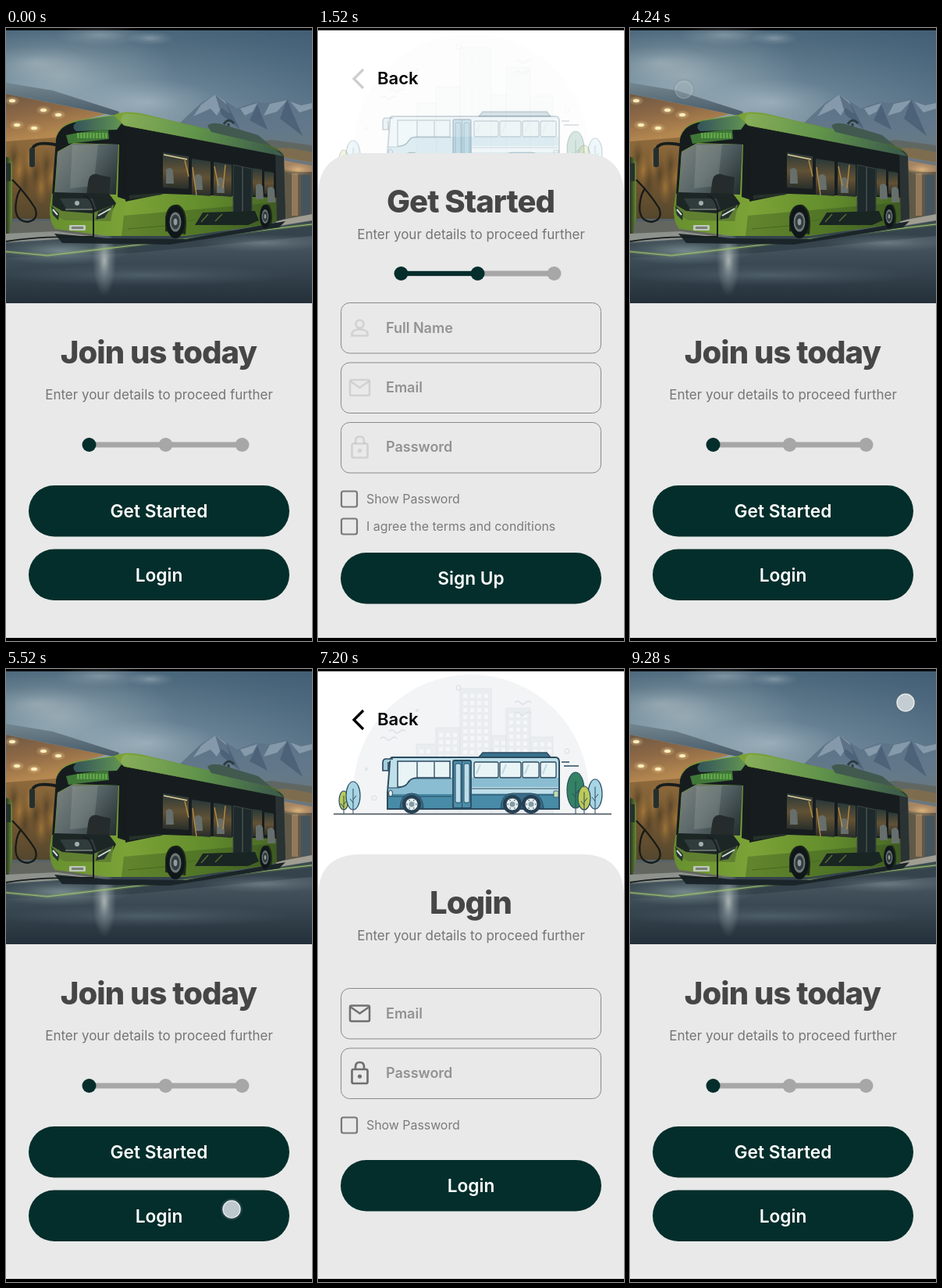
Write an HTML page with a canvas that moves like this. It is 392 by 784 pixels and loops after 9.36 s.

```html
<!DOCTYPE html>
<html lang="en">
<head>
<meta charset="utf-8">
<title>Bus app sign-in</title>
<style>
html, body { margin: 0; width: 100%; height: 100%; overflow: hidden; background: #e9e9e9; }
canvas, svg { position: absolute; left: 0; top: 0; width: 392px; height: 784px; }
text { font-family: Inter, Roboto, sans-serif; }
.mid { text-anchor: middle; }
.title { font-size: 40px; font-weight: 800; letter-spacing: -.95px; fill: #464646; }
.sub { font-size: 17px; fill: #757575; }
.btn { font-size: 22.7px; font-weight: 600; fill: #fff; }
.field { font-size: 18px; font-weight: 600; fill: #929292; }
.check { font-size: 15.9px; fill: #7b7b7b; }
.back { font-size: 22px; font-weight: 600; fill: #000; }
</style>
</head>
<body>
<canvas id="stage"></canvas>
<svg viewBox="0 0 392 784">
  <g id="welcome">
    <text class="mid title" x="195.5" y="429">Join us today</text>
    <text class="mid sub" x="196" y="475">Enter your details to proceed further</text>
    <text class="mid btn" x="196" y="626">Get Started</text>
    <text class="mid btn" x="196" y="708">Login</text>
  </g>
  <g id="signup">
    <text class="back" x="76" y="72">Back</text>
    <text class="mid title" x="195.5" y="236">Get Started</text>
    <text class="mid sub" x="196" y="270">Enter your details to proceed further</text>
    <text class="field" x="87" y="390">Full Name</text>
    <text class="field" x="87" y="466">Email</text>
    <text class="field" x="87" y="542">Password</text>
    <text class="check" x="62" y="608">Show Password</text>
    <text class="check" x="62" y="643">I agree the terms and conditions</text>
    <text class="mid btn" x="196" y="712">Sign Up</text>
  </g>
  <g id="login">
    <text class="back" x="76" y="72">Back</text>
    <text class="mid title" x="195.5" y="313">Login</text>
    <text class="mid sub" x="196" y="347">Enter your details to proceed further</text>
    <text class="field" x="87" y="447">Email</text>
    <text class="field" x="87" y="523">Password</text>
    <text class="check" x="62" y="589">Show Password</text>
    <text class="mid btn" x="196" y="669">Login</text>
  </g>
</svg>
<script>
const W = 392, H = 784, LOOP = 9360, FADE = 420;
const DARK = '#032e2b', GREY = '#a7a7a7', PAGE = '#e9e9e9', INK = '#2b4a60';
const canvas = document.getElementById('stage');
const ratio = window.devicePixelRatio || 1;
canvas.width = W * ratio;
canvas.height = H * ratio;
const c = canvas.getContext('2d');

// Each screen holds until the next one starts
const screens = [
  { at: 0, name: 'welcome' }, { at: 1440, name: 'signup' },
  { at: 4160, name: 'welcome' }, { at: 5760, name: 'login' },
  { at: 7600, name: 'welcome' }
];
const taps = [
  { x: 285, y: 616, from: 1120, to: 1250 },
  { x: 69, y: 79, from: 4000, to: 4130 },
  { x: 289, y: 691, from: 5440, to: 5570 },
  { x: 69, y: 72, from: 7440, to: 7570 },
  { x: 353, y: 43, from: 9240, to: 9360 }
];

function path(d, fill, stroke, width = 1) {
  const p = new Path2D(d);
  if (fill) { c.fillStyle = fill; c.fill(p); }
  if (stroke) { c.strokeStyle = stroke; c.lineWidth = width; c.stroke(p); }
}
function rect(x, y, w, h, fill, r = 0, stroke, width = 1) {
  c.beginPath();
  c.roundRect(x, y, w, h, r);
  if (fill) { c.fillStyle = fill; c.fill(); }
  if (stroke) { c.strokeStyle = stroke; c.lineWidth = width; c.stroke(); }
}
function oval(x, y, rx, ry, fill, stroke, width = 1) {
  c.beginPath();
  c.ellipse(x, y, rx, ry, 0, 0, Math.PI * 2);
  if (fill) { c.fillStyle = fill; c.fill(); }
  if (stroke) { c.strokeStyle = stroke; c.lineWidth = width; c.stroke(); }
}
function blend(g, ...colors) {
  colors.forEach((color, i) => g.addColorStop(i / (colors.length - 1), color));
  return g;
}
const linear = (x0, y0, x1, y1, ...colors) => blend(c.createLinearGradient(x0, y0, x1, y1), ...colors);
function glow(x, y, rx, ry, color, strength = .8) {
  c.save();
  c.translate(x, y);
  c.scale(rx, ry);
  c.fillStyle = blend(c.createRadialGradient(0, 0, 0, 0, 0, 1),
    `rgba(${color},${strength})`, `rgba(${color},${strength * .38})`, `rgba(${color},0)`);
  c.fillRect(-1, -1, 2, 2);
  c.restore();
}

function backdrop() {
  rect(0, 3, W, 260, linear(0, 3, 0, 160, '#4c687b', '#758f9f', '#a0b0b6'));
  rect(0, 3, W, 180, linear(150, 0, W, 0, 'rgba(56,84,110,0)', 'rgba(56,84,110,.5)'));
  glow(70, 62, 150, 65, '190,204,207', .5);
  glow(40, 45, 70, 22, '205,214,214', .3);
  glow(122, 9, 60, 14, '190,202,208', .4);
  glow(185, 13, 30, 9, '185,198,206', .45);
  glow(180, 95, 90, 30, '185,200,209', .5);
  path('M218 126 L238 107 L250 96 L268 85 L282 94 L296 103 L318 95 L337 96 L360 91 L376 98 L392 94 V200 H218Z', linear(0, 86, 0, 175, '#5b7289', '#63798a', '#6b7878'));
  path('M268 85 L250 98 L240 113 L262 103 L270 112 L276 102 L287 110 L281 94Z M300 103 L322 96 L316 107 L306 112Z M338 97 L361 92 L347 107 L330 112Z M364 94 L378 99 L392 96 V103 L376 108Z', 'rgba(160,178,192,.6)');
  path('M268 85 L284 99 L300 130 L276 111Z M322 98 L335 130 L312 118Z M360 91 L351 116 L380 138 L366 106Z', 'rgba(62,83,106,.55)');
  path('M300 148 L340 143 L392 150 V185 H300Z', 'rgba(93,93,78,.6)');
  path('M330 157 Q355 149 392 159 V190 H330Z', '#7d6d4e');
  path('M285 136 V122 M279 123 Q285 114 292 122', null, '#2c3c44', 3);
  path('M0 128 H72 V250 H0Z', linear(0, 128, 0, 250, '#95703f', '#775831', '#50452d'));
  for (let i = 0; i < 9; i++) glow(10 + i * 7, 165 + (i * 17) % 46, 8, 22, i % 2 ? '184,134,60' : '70,58,36', .6);
  path('M0 84 L128 110 L85 121 Q68 127 64 140 L0 145Z', linear(0, 84, 12, 145, '#6f5843', '#8d6946', '#b58850'));
  path('M0 70 L60 80 L145 107 L143 113 L0 84Z', linear(0, 70, 0, 112, '#728690', '#485b67'));
  for (const [x, y] of [[8, 93], [14, 124], [36, 128], [48, 105], [67, 111]]) {
    glow(x, y, 10, 6, '255,225,155');
    oval(x, y, 4, 2, '#ffefc1');
  }
  path('M352 165 L392 172 V187 L356 181Z', '#a58463');
  path('M352 165 L392 172 V176 L354 169Z', '#697781');
  rect(356, 184, 36, 61, '#60594a');
  rect(366, 186, 8, 54, '#93795b');
  rect(378, 188, 12, 52, '#46545d');
  glow(374, 181, 18, 8, '255,213,141', .6);
}
function ground() {
  rect(0, 244, W, 109, linear(0, 244, 0, 353, '#56626a', '#3b4a54', '#232f39'));
  path('M0 248 L75 246 L130 266 L0 274Z', '#62665f');
  path('M0 263 L65 260 L115 267 L0 274Z', '#8e928c');
  path('M0 276 L115 267 L330 257 L392 247 V266 L160 288 L0 294Z', '#35434c');
  glow(70, 285, 90, 18, '159,181,184', .6);
  glow(126, 298, 15, 45, '221,231,228', .65);
  glow(180, 316, 190, 14, '117,137,149', .4);
  glow(330, 275, 85, 11, '128,145,153', .6);
  path('M0 286 L53 291 L392 251', null, 'rgba(154,215,77,.2)', 4);
  path('M0 286 L53 291 L392 251', null, '#a3bf78', 1.2);
  path('M345 247 L392 238 V246 L350 253Z', '#a09d92');
}
function charger() {
  path('M0 165 Q8 165 8 178 V242 L4 263 H0Z', linear(0, 0, 9, 0, '#283424', '#6f9733'));
  rect(0, 173, 6, 23, '#27302e');
  path('M8 194 Q25 211 37 230 Q43 245 28 248 Q9 247 13 222 Q15 209 20 205', null, '#171b19', 2.3);
  path('M0 273 Q40 266 112 267 V231 Q108 215 99 215', null, '#171d1d', 2);
}
function photoBus() {
  path('M62 263 L130 269 L230 270 L358 247 L350 255 L210 277 L72 275Z', '#1b2529');
  path('M56 230 L61 193 L64 141 Q67 124 91 118 L139 111 Q151 105 172 109 L300 139 Q350 150 356 163 L358 243 L337 251 L230 266 H130 L63 257Q55 247 56 230Z', linear(56, 0, 358, 0, '#67902f', '#7ba337', '#628c2c', '#456225'));
  path('M151 240 L358 222 V243 L337 251 L230 266 H148Z', 'rgba(38,62,24,.3)');
  path('M152 125 L346 161 L349 217 L202 212 L153 222Z', '#171d1f');
  path('M345 156 Q354 158 356 165 L358 244 L347 247Z', '#2a3234');
  path('M64 142 Q68 124 91 120 L137 113 L154 127 L155 220 L143 216 L145 149 L86 147 L66 158 L62 212 L59 212Z', '#161c1e');
  path('M92 119 L139 112 L148 122 L142 130 L90 132Q82 126 92 119Z', linear(90, 0, 145, 0, '#36575a', '#5f9152'));
  path('M77 137 Q98 132 131 130 L132 142 L80 148Z', '#3f7737');
  for (let x = 91; x < 130; x += 4) rect(x, 134, 2.7, 7, '#62a64a');
  path('M66 159 L85 148 L144 149 L141 213 L63 211Z', linear(62, 150, 145, 210, '#7c8480', '#566366', '#222c2d'));
  path('M85 150 L118 149 L112 202 L82 205Z', 'rgba(184,194,182,.2)');
  path('M105 198 Q107 183 120 188 L134 191 L132 215 H103Z', '#252c2b');
  path('M60 210 L132 212 L141 224 L131 244 L75 242 L59 230Z', '#1c2625');
  path('M58 226 L72 234 L110 237 L138 226 L134 247 L75 246 L58 237Z', '#607f31');
  path('M69 218 L111 218 L116 232 L77 231Z', '#303c3b');
  path('M76 232 H113', null, '#a3ada5', 1);
  oval(91, 224, 3, 3, '#a3afac');
  path('M58 227 L68 237 L67 246 L60 239Z M118 235 L137 226 L126 243 L115 245Z', '#263230');
  path('M60 232 L66 239 M118 240 L134 231', null, '#d2dfd2', 2);
  rect(81, 252, 21, 7, '#bfc6bb', 1);
  rect(84, 254, 15, 3, '#778276');
  path('M72 151 Q38 143 34 154 L32 172', null, '#171d1d', 4);
  rect(30, 153, 7, 25, '#24302f', 3);
  for (const [x, y, w, h] of [[201, 159, 33, 47], [238, 167, 24, 48], [266, 171, 23, 45], [316, 179, 12, 37], [331, 183, 12, 31]]) {
    path(`M${x} ${y} l${w} ${w * .16} v${h - w * .16} l${-w} -2z`, linear(0, y, 0, y + h, '#283839', '#625235', '#282e2b'));
    path(`M${x + 4} ${y + 22} q6 -5 9 2 l1 16 h-10z`, '#666f6b');
  }
  path('M202 162 L232 168', null, '#e6d19b', 1.6);
  path('M229 169 L234 190 M239 178 L244 214 M267 177 L272 202 M281 175 L278 205', null, '#b98a42', 1.4);
  path('M291 175 L315 180 V250 L291 252Z', '#1d292a', '#3d4743');
  path('M303 178 V250', null, '#505d5a', 1.2);
  path('M158 214 L200 211 L200 213 L158 219Z', '#25312a');
  path('M242 252 L252 236 L319 234 L324 246 L310 252Z', '#192522');
  path('M250 248 L259 238 M268 247 L277 238', null, '#5c7630', 1.2);
  path('M204 260 V242 Q207 224 221 226 Q231 231 231 250 L230 264Z M326 250 V236 Q329 223 337 226 Q341 232 341 244 L340 251Z', '#1d2b19');
  for (const [x, y, rx, ry] of [[217, 248, 12, 21], [332, 241, 7, 15]]) {
    oval(x, y, rx, ry, '#101719');
    oval(x, y, rx * .62, ry * .6, '#6d777a');
    oval(x, y, rx * .45, ry * .44, '#323d40');
    oval(x, y, rx * .2, ry * .2, '#939b9a');
  }
  path('M151 110 Q173 107 300 141 Q346 151 355 164 L154 125 Q142 121 151 110Z', linear(150, 108, 340, 161, '#88ae58', '#60934a', '#3e5e4b'));
  path('M258 125 Q264 119 280 124 L323 137 L340 151 L263 133Z', '#41594f');
  path('M156 257 L204 253 M232 247 L243 245', null, '#47691f', 1);
}

function tree(x, y, rx, ry, fill) {
  oval(x, y, rx, ry, fill, INK, 1.2);
  path(`M${x} ${y - ry * .5} V185 M${x} ${y + 5} l4 -5 M${x} ${y + 9} l-4 -5`, null, INK, 1);
}
function wheel(x) {
  oval(x, 173, 12, 12, '#263f51');
  oval(x, 173, 8, 8, '#e9f0f1', INK, 1);
  oval(x, 173, 3.5, 3.5, '#839ba6');
  for (let i = 0; i < 6; i++) oval(x + 5.7 * Math.cos(i * 1.047), 173 + 5.7 * Math.sin(i * 1.047), .8, .8, INK);
}
function cartoonBus() {
  c.save();
  c.beginPath();
  c.rect(0, 3, W, 182);
  c.clip();
  oval(196, 158, 151, 151, '#f2f4f5');
  for (const [x, y, w] of [[151, 75, 31], [182, 25, 40], [222, 85, 19], [241, 50, 31], [272, 87, 29], [126, 96, 26]]) {
    rect(x, y, w, 185 - y, '#e9edef', 0, '#e0e5e7', .8);
    for (let wy = y + 7; wy < 112; wy += 9)
      for (let wx = x + 4; wx < x + w - 4; wx += 9) rect(wx, wy, 5, 5, '#f4f6f7');
  }
  c.restore();
  for (const [x, y] of [[252, 43], [252, 57], [80, 89], [91, 80]])
    path(`M${x} ${y} q4 -4 7 0 t7 0 t7 0`, null, '#dce1e4', 1.5);
  for (const [x, y] of [[180, 24], [319, 105], [72, 165]]) oval(x, y, 3, 3, null, '#d5dde1');
  for (const [x, y] of [[62, 128], [127, 53]]) path(`M${x - 2} ${y - 2} l4 4 m0 -4 l-4 4`, null, '#d5dde1');
  tree(33, 168, 6, 12, '#b9cb59');
  tree(45, 162, 9, 18, '#a8d5e4');
  tree(330, 155, 11, 23, '#328263');
  tree(355, 160, 9, 19, '#a8d5e4');
  tree(341, 165, 8, 15, '#bdca58');
  path('M20 185.5 H376', null, '#424e59', 1.4);
  path('M206 113 L211 107 H293 L298 113Z', '#39718c', INK, 1.5);
  path('M95 113 H304 Q309 113 309 119 V179 H89 V158 L92 120 Q92 113 95 113Z', '#bfdfe9', INK, 2);
  path('M90 152 H104 Q114 151 118 143 Q119 139 128 139 H308 V151 H197 V159 H308 V178 H90Z', '#8abdd1');
  path('M90 160 H308 V178 H90Z', '#478ba7');
  path('M90 152 H103 Q115 150 119 140 H171 M197 153 H308 M90 163 H171 M197 161 H308', null, INK, 1.2);
  path('M102 118 H169 V139 H128 Q118 139 114 147 Q111 151 102 151Z', '#e9f4f6', INK, 1.5);
  path('M127 119 V139 M149 119 V139', null, INK, 1.3);
  for (const [x, w] of [[200, 31], [233, 27], [262, 21], [285, 20]]) {
    rect(x, 119, w, 20, '#e9f4f6', 2, INK, 1.3);
    path(`M${x + 8} 122 l-5 12`, null, '#bfdbe4', 2);
  }
  rect(173, 117, 23, 61, '#4b8da9', 2, INK, 1.8);
  for (const x of [176, 187]) rect(x, 121, 7, 50, '#bddfeb', 2, INK, 1);
  path('M184.5 118 V178', null, INK, 1);
  path('M96 115 H87 Q83 115 83 120 V130 H90 V119', '#a6cddb', INK, 1.7);
  oval(93, 159, 2.5, 4, '#e9f1eb', INK, 1);
  path('M105 178 Q106 159 120 159 Q134 159 135 178Z M234 178 Q235 159 249 159 H273 Q287 159 289 178Z', '#376d88', INK, 1);
  [120, 249, 273].forEach(wheel);
  rect(302, 156, 6, 8, '#c1ddb4', 1, INK, .8);
  path('M312 119 H322 M315 124 H334', null, INK, 1.4);
}

function button(y) { rect(29, y, 334, 65.5, DARK, 32.75); }
function field(y) { rect(29.5, y + .5, 333, 64.5, null, 11, '#898989', 1); }
function checkbox(y) { rect(30, y + 1, 20, 20, null, 2.5, '#787878', 2.2); }
function steps(y, done) {
  rect(115, y - 3.5, 188, 7, GREY);
  if (done > 1) rect(107, y - 3, 98, 6, DARK);
  [106.5, 204.5, 302.5].forEach((x, i) => oval(x, y, 9, 9, i < done ? DARK : GREY));
}
function sheet(y) {
  path(`M0 ${y + 55} Q0 ${y} 55 ${y} H337 Q392 ${y} 392 ${y + 55} V780 H0Z`, PAGE);
}
const icons = {
  person(y) {
    oval(53.5, y - 5, 5, 5, null, '#707070', 2.7);
    path(`M43.5 ${y + 10} V${y + 7} Q45 ${y + 2} 53.5 ${y + 2} Q62 ${y + 2} 63.5 ${y + 7} V${y + 10}Z`, null, '#707070', 2.7);
  },
  mail(y) {
    rect(41, y - 10, 25, 20, null, 2, '#707070', 2.5);
    path(`M42 ${y - 8} L53.5 ${y} L65 ${y - 8}`, null, '#707070', 2.5);
  },
  lock(y) {
    rect(43.5, y - 5, 20, 18, null, 2, '#707070', 2.7);
    path(`M48 ${y - 5} V${y - 8} Q48 ${y - 14} 53.5 ${y - 14} Q59 ${y - 14} 59 ${y - 8} V${y - 5}`, null, '#707070', 2.7);
    oval(53.5, y + 4, 2.6, 2.6, '#707070');
  }
};

// Pictures and icons fade in after a form opens
function form(top, fade, fields) {
  rect(0, 3, W, 777, '#fff');
  c.globalAlpha = fade;
  cartoonBus();
  path('M58 53 L46 65 L58 77', null, '#000', 3.3);
  c.globalAlpha = 1;
  sheet(top);
  for (const [y, icon] of fields) {
    field(y);
    c.globalAlpha = fade;
    icons[icon](y + 32.5);
    c.globalAlpha = 1;
  }
}
const draw = {
  welcome() {
    backdrop();
    ground();
    photoBus();
    charger();
    rect(0, 352, W, 428, PAGE);
    steps(533, 1);
    button(585);
    button(666.5);
  },
  signup(fade) {
    form(160, fade, [[351, 'person'], [427.5, 'mail'], [504, 'lock']]);
    steps(314, 2);
    checkbox(591.5);
    checkbox(626.5);
    button(671);
  },
  login(fade) {
    form(237, fade, [[408, 'mail'], [484.5, 'lock']]);
    checkbox(572.5);
    button(628);
  }
};
function touch({ x, y, from, to }, t) {
  const alpha = t < from ? 0 : t <= to ? 1 : Math.max(0, 1 - (t - to) / 145);
  if (!alpha) return;
  c.globalAlpha = alpha;
  oval(x, y, 14, 14, 'rgba(90,105,110,.3)');
  oval(x, y, 11, 11, 'rgba(207,216,219,.9)', 'rgba(240,244,245,.85)', 1.5);
  c.globalAlpha = 1;
}
function frame(now) {
  const t = now % LOOP;
  const screen = screens.filter(s => s.at <= t).pop();
  c.setTransform(ratio, 0, 0, ratio, 0, 0);
  rect(0, 0, W, H, '#000');
  draw[screen.name](Math.min(1, (t - screen.at) / FADE));
  taps.forEach(tap => touch(tap, t));
  for (const name in draw) document.getElementById(name).style.display = name === screen.name ? '' : 'none';
  requestAnimationFrame(frame);
}
requestAnimationFrame(frame);
</script>
</body>
</html>
```
